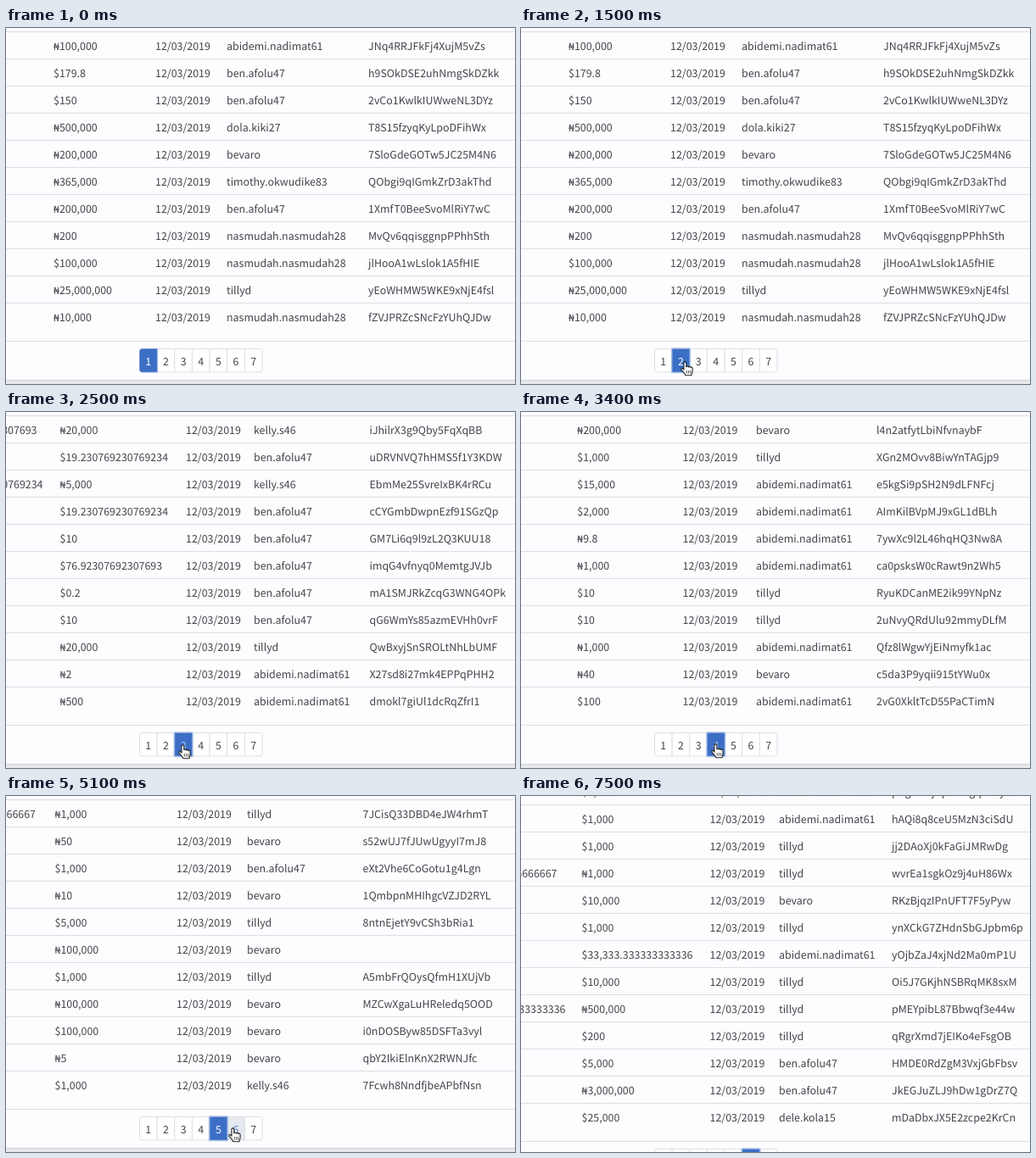
Write an HTML page that moves like this. It is 600 px wide and 420 px high and loops after 7700 ms.

```html
<!DOCTYPE html>
<html lang="en">
<head>
<meta charset="utf-8">
<title>Paged transactions table</title>
<style>
  html, body { margin: 0; width: 100%; height: 100%; overflow: hidden; background: #fdfcfe; }
  svg { display: block; width: 600px; height: 420px; }
  text {
    font: 12.43px "Noto Sans CJK JP", "Noto Sans CJK SC", "Noto Sans CJK", "Source Sans Pro", "Open Sans", sans-serif;
    fill: #42454a; text-rendering: geometricPrecision; white-space: pre;
  }
  .naira { font: 11.5px "Noto Sans Mono", "DejaVu Sans Mono", monospace; }
  .end { text-anchor: end; }
  .num { text-anchor: middle; fill: #41464e; }
  .rule { stroke: #dbdee3; }
  .cell { fill: #fff; stroke: #dcdfe4; }
  .hover .cell { fill: #e6e9ee; }
  .hover .num { fill: #4a78c8; }
  .on .cell { fill: #3c6ec5; stroke: #7397d6; }
  .on .num { fill: #fff; }
  .on.fresh .num { fill: #b4c8ec; }
  .ring { fill: none; stroke: #a9c0e8; stroke-width: 1.2; visibility: hidden; }
  .focus .ring { visibility: visible; }
</style>
</head>
<body>
<svg viewBox="0 0 600 420">
  <g id="sheet">
    <g id="rules"></g>
    <g id="pages"></g>
    <rect y="415" width="600" height="60" fill="#e6e8ed"/>
    <path d="M0 415.5H600" stroke="#d0d3d9"/>
    <g id="pager"></g>
  </g>
  <g id="hand">
    <g transform="translate(-2 -1) scale(1.1)" stroke="#222" stroke-linejoin="round" stroke-linecap="round">
      <path fill="#fff" d="M3.6 9.2V2.1a1.3 1.3 0 0 1 2.6 0V6.2a1.2 1.2 0 0 1 2.3.3a1.2 1.2 0 0 1 2.3.5a1.1 1.1 0 0 1 2 .7V10.6c0 1.5-.9 2-1 4.6H5.2C5 13.4 2.9 11.8 1 9.4c-.9-1.4.6-2.2 1.4-1.4z"/>
      <path fill="none" stroke-width=".7" d="M6.6 10.4v2.6M8.6 10.4v2.6M10.5 10.4v2.6"/>
    </g>
  </g>
  <path id="arrow" fill="#111" stroke="#fff" d="M.7.7V13.5l3-2.8 2 4.6 2-.9-2-4.4H10z"/>
</svg>
<script>
const LOOP = 7700, STEP = 100, ROW = 32, BASE = 25.6;
const $ = id => document.getElementById(id);

const users = {
  a: "abidemi.nadimat61", j: "ben.afolu47", b: "dola.kiki27", g: "bevaro",
  p: "timothy.okwudike83", h: "nasmudah.nasmudah28", f: "tillyd",
  r: "kelly.s46", o: "dele.kola15"
};

// cols: x of amount, date, user, id. Row: amount, user key, id, overhang text, its right edge.
const pages = [
  { at: 0, cols: [56, 176, 260, 427], rows: `
    ₦100,000 a JNq4RRJFkFj4XujM5vZs
    $179.8 j h9SOkDSE2uhNmgSkDZkk
    $150 j 2vCo1KwlkIUWweNL3DYz
    ₦500,000 b T8S15fzyqKyLpoDFihWx
    ₦200,000 g 7SloGdeGOTw5JC25M4N6
    ₦365,000 p QObgi9qIGmkZrD3akThd
    ₦200,000 j 1XmfT0BeeSvoMlRiY7wC
    ₦200 h MvQv6qqisggnpPPhhSth
    $100,000 h jlHooA1wLslok1A5fHIE
    ₦25,000,000 f yEoWHMW5WKE9xNjE4fsl
    ₦10,000 h fZVJPRZcSNcFzYUhQJDw` },
  { at: 1600, cols: [63, 206, 289, 433], rows: `
    ₦5,000 a kT4mQe8RsVh2LwXc9BnD
    $10 j Zr7YpGd3KuNa5HfMx1Ws
    ₦20,000 f vB6cJt0SqEy9RgLo2PkU
    $250 j N3hWfXi8DzAm4CbVu7Te 0769234 43
    ₦1,000 r gQ5sLk1MrOy6JdPn0HxF
    $76.92307692307693 j wE2vTa9BcRi7ZpKh4UgS
    ₦500 g Xo8LmDf3NqJy1WsVe6Ct
    $10 j rK0bGz5HuPa2MiTx7QdY
    ₦2,000 f Fn4SjVc9EwLo6RkBh1Zm 307693 36
    $100 a yU7tIp3AxGq8DsNe5KvJ
    ₦50 g Cd1MhWr6ObTf0LzYu2Xg` },
  { at: 2500, cols: [63.5, 212, 292, 428.5], rows: `
    ₦20,000 r iJhilrX3g9Qby5FqXqBB ₦76.92307692307693 36.5
    $19.230769230769234 j uDRVNVQ7hHMS5f1Y3KDW
    ₦5,000 r EbmMe25SvreIxBK4rRCu ₦19.230769230769234 43.5
    $19.230769230769234 j cCYGmbDwpnEzf91SGzQp
    $10 j GM7Li6q9l9zL2Q3KUU18
    $76.92307692307693 j imqG4vfnyq0MemtgJVJb
    $0.2 j mA1SMJRkZcqG3WNG4OPk
    $10 j qG6WmYs85azmEVHh0vrF
    ₦20,000 f QwBxyjSnSROLtNhLbUMF
    ₦2 a X27sd8i27mk4EPPqPHH2
    ₦500 a dmokl7giUl1dcRqZfrI1` },
  { at: 3400, cols: [66.3, 190.5, 277, 419], rows: `
    ₦200,000 g l4n2atfytLbiNfvnaybF
    $1,000 f XGn2MOvv8BiwYnTAGjp9
    $15,000 a e5kgSi9pSH2N9dLFNFcj
    $2,000 a AImKilBVpMJ9xGL1dBLh
    ₦9.8 a 7ywXc9l2L46hqHQ3Nw8A
    ₦1,000 a ca0psksW0cRawt9n2Wh5
    $10 f RyuKDCanME2ik99YNpNz
    $10 f 2uNvyQRdUlu92mmyDLfM
    ₦1,000 a Qfz8lWgwYjEiNmyfk1ac
    ₦40 g c5da3P9yqii915tYWu0x
    $100 a 2vG0XkltTcD55PaCTimN` },
  { at: 4300, cols: [57.5, 201, 284, 420.5], rows: `
    ₦1,000 f 7JCisQ33DBD4eJW4rhmT ₦16.666666666666667 35
    ₦50 g s52wUJ7fJUwUgyyI7mJ8
    $1,000 j eXt2Vhe6CoGotu1g4Lgn
    ₦10 g 1QmbpnMHIhgcVZJD2RYL
    $5,000 f 8ntnEjetY9vCSh3bRia1
    ₦100,000 g
    $1,000 f A5mbFrQOysQfmH1XUjVb
    ₦100,000 g MZCwXgaLuHReledq5OOD
    $100,000 g i0nDOSByw85DSFTa3vyl
    ₦5 g qbY2IkiElnKnX2RWNJfc
    $1,000 r 7Fcwh8NndfjbeAPbfNsn` },
  { at: 5500, cols: [71.5, 222.5, 304, 437], above: 2, rows: `
    $1,000 a pRgmXvjKpdHBgqTnEyLs
    $1,000 a hAQi8q8ceU5MzN3ciSdU
    $1,000 f jj2DAoXj0kFaGiJMRwDg
    ₦1,000 f wvrEa1sgkOz9j4uH86Wx ₦16.666666666666667 42.5
    $10,000 g RKzBjqzIPnUFT7F5yPyw
    $1,000 f ynXCkG7ZHdnSbGJpbm6p
    $33,333.333333333336 a yOjbZaJ4xjNd2Ma0mP1U
    $10,000 f Oi5J7GKjhNSBRqMK8sxM
    ₦500,000 f pMEYpibL87Bbwqf3e44w $33,333.333333333336 52.5
    $200 f qRgrXmd7jEIKo4eFsgOB
    $5,000 j HMDE0RdZgM3VxjGbFbsv
    ₦3,000,000 j JkEGJuZLJ9hDw1gDrZ7Q
    $25,000 o mDaDbxJX5E2zcpe2KrCn` }
];

const label = (x, y, s, cls = "") =>
  `<text x="${x}" y="${y}" class="${cls}">${s.replace("₦", '<tspan class="naira">₦</tspan>')}</text>`;

function rowMarkup(line, y, [amountX, dateX, userX, idX]) {
  const [amount, user, id = "", over, edge] = line.trim().split(" ");
  return label(amountX, y, amount) + label(dateX, y, "12/03/2019") +
    label(userX, y, users[user]) + label(idX, y, id) +
    (over ? label(edge, y, over, "end") : "");
}

$("pages").innerHTML = pages.map(({ rows, cols, above = 0 }) =>
  "<g>" + rows.trim().split("\n").map((line, i) =>
    rowMarkup(line, BASE + (i - above) * ROW, cols)).join("") + "</g>").join("");

let rules = "";
for (let i = -1; i <= 10; i++) rules += `M0 ${5 + i * ROW - .5}H600`;
$("rules").innerHTML = `<path class="rule" d="${rules}M0 369.5H600"/>`;

// Pager cells
const LEFT = 157.5, PITCH = 20.65, TOP = 378.5, TALL = 27.5;
const cellPath = i => {
  const x = LEFT + i * PITCH, r = 3;
  if (i === 0) return `M${x + PITCH} ${TOP}H${x + r}q-3 0-3 3v${TALL - 6}q0 3 3 3H${x + PITCH}z`;
  if (i === 6) return `M${x} ${TOP}h${PITCH - r}q3 0 3 3v${TALL - 6}q0 3-3 3H${x}z`;
  return `M${x} ${TOP}h${PITCH}v${TALL}h${-PITCH}z`;
};
for (let i = 0; i < 7; i++) {
  const x = LEFT + i * PITCH;
  $("pager").innerHTML += `<g><path class="cell" d="${cellPath(i)}"/>
    <rect class="ring" x="${x - .7}" y="${TOP - .7}" width="${PITCH + 1.4}" height="${TALL + 1.4}" rx="1"/>
    ${label(x + PITCH / 2, 397.6, String(i + 1), "num")}</g>`;
}
const cells = [...$("pager").children], sheets = [...$("pages").children];

const clicks = [0, 1400, 2500, 3400, 4300, 5500];

// Pointer stops: time, x, y
const path = [
  [700, 174, 418], [1300, 190, 394], [2000, 190, 394], [2400, 205, 393],
  [2800, 205, 393], [3200, 226, 392], [3700, 226, 392], [4100, 246, 392],
  [4600, 246, 392], [5000, 264, 392], [6100, 264, 392], [6200, 345, 372], [6300, 461, 344]
];
const ease = u => u * u * (3 - 2 * u);

function pointer(t) {
  if (t < path[0][0] || t > 6300) return null;
  const i = Math.max(1, path.findIndex(p => p[0] >= t));
  const [ta, xa, ya] = path[i - 1], [tb, xb, yb] = path[i];
  const k = ease((t - ta) / (tb - ta));
  return [xa + (xb - xa) * k, ya + (yb - ya) * k];
}

const lastIndex = (list, t) => list.filter(v => v <= t).length - 1;
const show = (el, on) => el.style.display = on ? "" : "none";
const move = (el, x, y) => el.setAttribute("transform", `translate(${x} ${y})`);
const scroll = t => t < 6900 ? 0 : t < 7000 ? 10 : t < 7100 ? 28 : 38;

function draw(t) {
  const page = lastIndex(pages.map(p => p.at), t), active = lastIndex(clicks, t);
  sheets.forEach((el, i) => show(el, i === page));
  move($("sheet"), 0, scroll(t));

  const pos = pointer(t);
  let over = -1;
  if (pos && pos[1] > 378 && pos[1] < 406) over = Math.floor((pos[0] + 4.5 - LEFT) / PITCH);
  if (over > 6) over = -1;

  cells.forEach((el, i) => {
    const on = i === active;
    el.setAttribute("class", on
      ? "on" + (i ? " focus" : "") + (i && t === clicks[i] ? " fresh" : "")
      : i === over ? "hover" : "");
  });
  // The active cell lies on top so that its ring is whole.
  if ($("pager").lastChild !== cells[active]) $("pager").append(cells[active]);

  show($("hand"), pos && over >= 0);
  show($("arrow"), pos && over < 0);
  if (pos) {
    move($("hand"), ...pos);
    move($("arrow"), ...pos);
  }
}

const start = performance.now();
let last = -1;
function tick() {
  const t = Math.floor(((performance.now() - start) % LOOP) / STEP) * STEP;
  if (t !== last) draw(last = t);
  requestAnimationFrame(tick);
}
tick();
</script>
</body>
</html>
```
